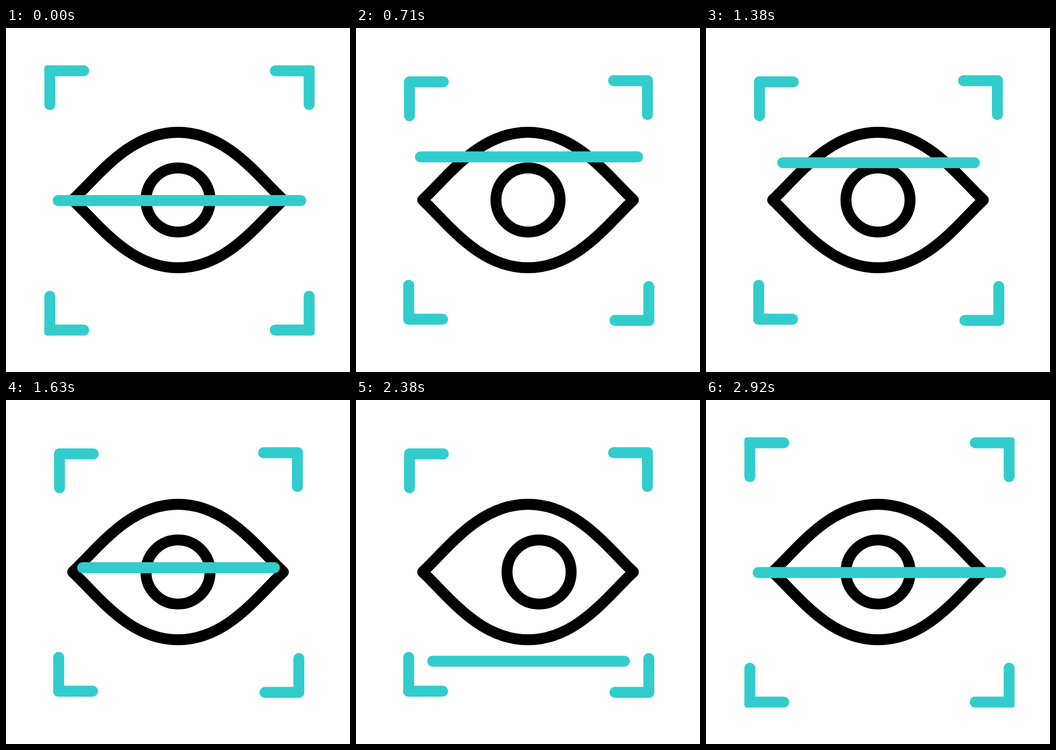
These frames come from a looping animation (640 px wide and 640 px high, 3 s). An HTML page with a canvas:

```html
<!DOCTYPE html>
<html lang="en">
<head>
<meta charset="utf-8">
<title>Eye scan</title>
<style>
html, body { margin: 0; width: 100%; height: 100%; overflow: hidden; background: #fff; }
canvas { display: block; width: 640px; height: 640px; }
</style>
</head>
<body>
<canvas id="stage" width="640" height="640"></canvas>
<script>
const ctx = document.getElementById('stage').getContext('2d');
const LOOP = 3000, TEAL = '#33cccc', WIDTH = 20.4;

const mix = (a, b, p) => a + (b - a) * p;
const ramp = (n, from, to) => Math.min(1, Math.max(0, (n - from) / (to - from)));
const ease = p => p * p * (3 - 2 * p);

// Rest point, scanning point, arm directions, tick when the move in ends
const corners = [
  [81.6, 79.6, 99.5, 100.2, 1, 1, 12.5],
  [564, 79.6, 542.2, 98, -1, 1, 12],
  [81.6, 562, 98, 541.8, 1, -1, 11],
  [564, 562, 544.8, 544, -1, -1, 11]
];

// Left half of each lid: [x1, y1, x2, y2, middle y]
const openTop = [173, 274, 230, 194, 194];
const openLow = [173, 366, 230, 446, 446];
const shutTop = [175, 361, 216, 389.4, 389.4];
const shutLow = [175, 362, 216, 392, 392];
const morph = (a, b, p) => a.map((v, i) => mix(v, b[i], p));

function lid(path, [x1, y1, x2, y2, mid], back) {
  if (back) {
    path.bezierCurveTo(640 - x1, y1, 640 - x2, y2, 320, mid);
    path.bezierCurveTo(x2, y2, x1, y1, 124, 320);
  } else {
    path.moveTo(124, 320);
    path.bezierCurveTo(x1, y1, x2, y2, 320, mid);
    path.bezierCurveTo(640 - x2, y2, 640 - x1, y1, 516, 320);
  }
}

function drawEye(n) {
  const shut = ease(ramp(n, 1, 9)) - ease(ramp(n, 11, 14));
  const look = 20.6 * (ramp(n, 50, 57) - ramp(n, 60, 70));
  const eye = new Path2D();
  lid(eye, morph(openTop, shutTop, shut));
  lid(eye, morph(openLow, shutLow, shut), true);
  eye.closePath();

  ctx.strokeStyle = '#000';
  ctx.save();
  ctx.clip(eye);
  ctx.beginPath();
  ctx.arc(320 + look, 320, 59.6, 0, Math.PI * 2);
  ctx.stroke();
  ctx.restore();
  ctx.stroke(eye);
}

function drawCorners(n) {
  const back = ease(ramp(n, 60, 70));
  for (const [x0, y0, x1, y1, dx, dy, end] of corners) {
    const p = ease(ramp(n, 1, end)) - back;
    const x = mix(x0, x1, p), y = mix(y0, y1, p);
    ctx.beginPath();
    ctx.moveTo(x + 63 * dx, y);
    ctx.lineTo(x, y);
    ctx.lineTo(x, y + 63 * dy);
    ctx.stroke();
    ctx.beginPath();
    ctx.roundRect(x - WIDTH / 2, y - WIDTH / 2, WIDTH, WIDTH, mix(5, WIDTH / 2, p));
    ctx.fill();
  }
}

function drawBeam(n) {
  const back = ramp(n, 60, 70);
  const narrow = ramp(n, 14, 20) - back;
  const y = 321 - 162.5 * ramp(n, 14, 20) + 327.5 * ramp(n, 24, 56) - 165 * back;
  ctx.beginPath();
  ctx.moveTo(mix(97, 142.7, narrow), y);
  ctx.lineTo(mix(548.4, 499.4, narrow), y);
  ctx.stroke();
}

function draw(now) {
  // 24 ticks per second
  const n = Math.floor((now % LOOP) * 0.024 + 0.1);
  ctx.fillStyle = '#fff';
  ctx.fillRect(0, 0, 640, 640);
  ctx.lineWidth = WIDTH;
  ctx.lineCap = ctx.lineJoin = 'round';
  drawEye(n);
  ctx.strokeStyle = ctx.fillStyle = TEAL;
  drawCorners(n);
  drawBeam(n);
}

const start = performance.now();
function tick() {
  draw(performance.now() - start);
  requestAnimationFrame(tick);
}
tick();
</script>
</body>
</html>
```
